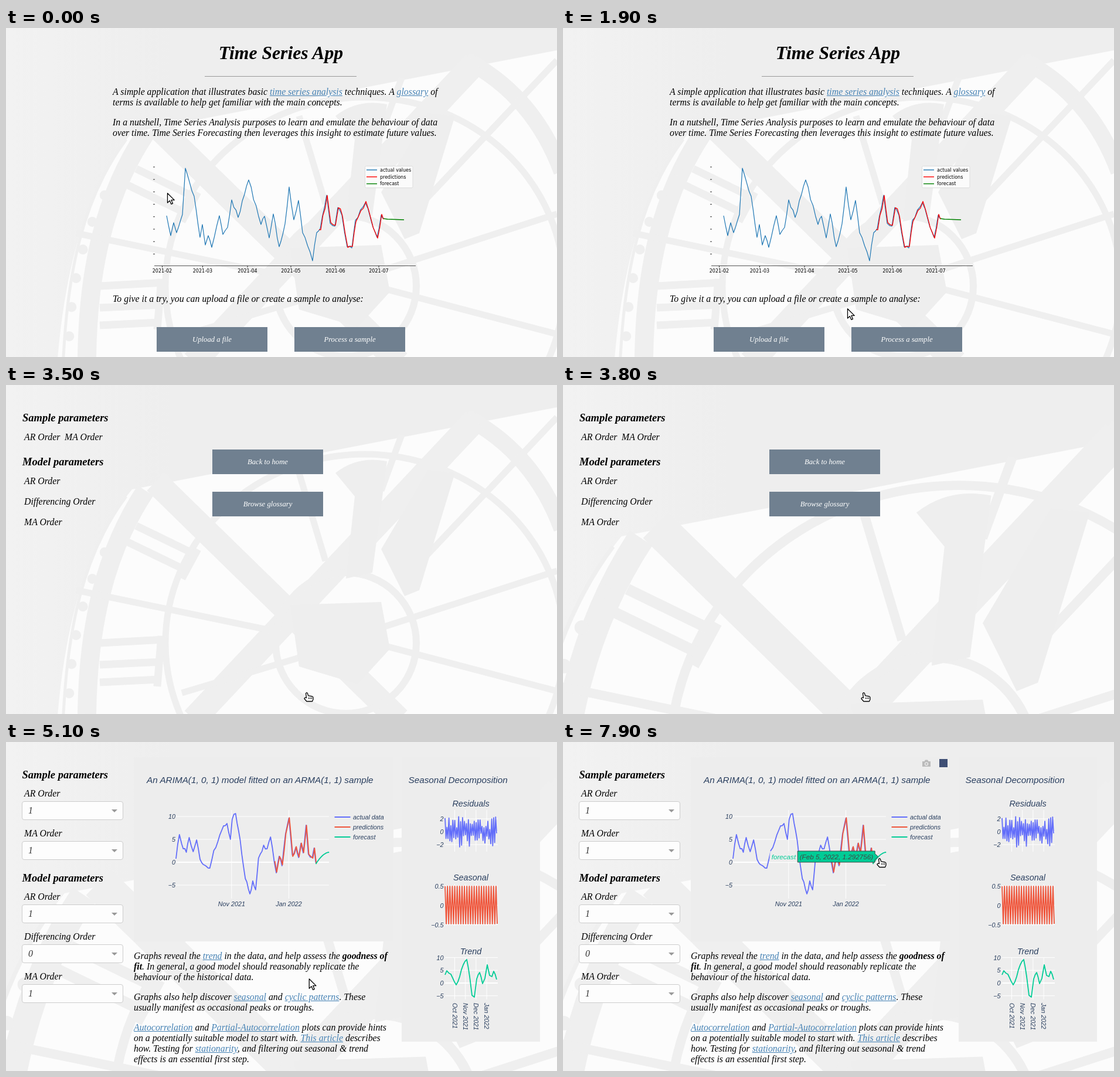
Recreate the animation shown at these times as an HTML page. Size 940x561 px, loop 8 s.

```html
<!DOCTYPE html>
<html lang="en">
<head>
<meta charset="utf-8">
<title>Time Series App</title>
<style>
html, body { margin: 0; width: 100%; height: 100%; overflow: hidden; background: #eee; }
#stage { position: relative; width: 940px; height: 561px; overflow: hidden;
  font: italic 15.84px/18px 'Liberation Serif', serif; color: #000; }
section, svg { position: absolute; left: 0; top: 0; width: 940px; height: 561px; }
#stage p, h1, h3, .btn, .select, hr { position: absolute; margin: 0; white-space: pre; }
h1 { left: 0; top: 24px; width: 938px; text-align: center; font-size: 2em; line-height: 37px; }
h3 { left: 28px; font-size: 1.17em; line-height: 21px; }
hr { left: 339px; top: 82px; width: 259px; height: 1px; border: 0; background: #999; }
u { color: #4682b4; }
.btn { width: 189px; height: 42px; background: #708090; color: #fff; font-size: .8em; line-height: 42px; text-align: center; }
.select { left: 27px; width: 161px; height: 30px; padding-left: 10px; border: 1px solid #ccc; border-radius: 4px;
  background: #fdfdfd; color: #333; line-height: 30px; }
.select::after { content: ''; position: absolute; right: 9px; top: 13px; border: 5px solid transparent; border-top-color: #999; border-bottom: 0; }
.axis { font: 8px 'DejaVu Sans', sans-serif; }
.plot { font: italic 10.8px 'Liberation Sans', sans-serif; fill: #2a3f5f; }
.title { font-size: 15.3px; }
.subtitle { font-size: 14.4px; text-anchor: middle; }
.hover { font-size: 11.7px; text-anchor: end; }
polyline { fill: none; stroke-linejoin: round; }
</style>
</head>
<body>
<div id="stage">
  <svg>
    <defs>
      <linearGradient id="wall"><stop stop-color="#f2f2f2"/><stop offset=".3" stop-color="#eee"/></linearGradient>
    </defs>
    <rect width="940" height="561" fill="url(#wall)"/>
    <g id="clock" fill="none" stroke="#efefef">
      <path fill="#fcfcfc" stroke="none" d="M215 178L940 38V720H82C82 420 140 270 215 178Z"/>
      <path stroke-width="32" d="M238 180C165 290 140 420 138 561"/>
      <path stroke-width="5" d="M205 190C130 290 105 420 98 561"/>
      <path stroke-width="17" stroke-linecap="round" stroke-dasharray="0 50" d="M195 243C145 310 107 420 107 561"/>
      <ellipse cx="612" cy="440" rx="340" ry="322" stroke-width="11"/>
      <path stroke-width="28" d="M785 55Q900 115 948 245"/>
      <path stroke-width="42" d="M255 165L670 570M800 60L320 570"/>
      <path stroke-width="11" d="M940 317L590 430 940 522M500 150L545 300M675 85L640 180M940 55L690 320M120 350L450 418M300 525L500 465"/>
      <path stroke-width="13" d="M160 440L268 434M160 477L265 472M160 507L262 502M265 428L258 514M222 240L325 290M208 268L305 315M327 280L300 330"/>
      <circle cx="580" cy="440" r="120" stroke-width="12"/>
      <path fill="#eee" stroke="none" d="M562 150Q600 120 650 130L625 320 580 330 595 190ZM720 145L766 150 705 350 680 360 640 280ZM485 375L640 370 655 450 600 510 500 480Z"/>
    </g>
  </svg>

  <section id="home">
    <h1>Time Series App</h1><hr>
    <p style="left:182px;top:100px">A simple application that illustrates basic <u>time series analysis</u> techniques. A <u>glossary</u> of
terms is available to help get familiar with the main concepts.</p>
    <p style="left:182px;top:152px">In a nutshell, Time Series Analysis purposes to learn and emulate the behaviour of data
over time. Time Series Forecasting then leverages this insight to estimate future values.</p>
    <p style="left:182px;top:453px">To give it a try, you can upload a file or create a sample to analyse:</p>
    <svg id="homeChart" class="axis"></svg>
    <div class="btn" style="left:257px;top:510px">Upload a file</div>
    <div class="btn" id="process" style="left:492px;top:510px">Process a sample</div>
  </section>

  <section id="loading">
    <h3 style="top:45px">Sample parameters</h3>
    <p style="left:31px;top:80px">AR Order</p><p style="left:100px;top:80px">MA Order</p>
    <h3 style="top:120px">Model parameters</h3>
    <p style="left:31px;top:155px">AR Order</p>
    <p style="left:31px;top:190px">Differencing Order</p>
    <p style="left:31px;top:225px">MA Order</p>
    <div class="btn" style="left:352px;top:110px">Back to home</div>
    <div class="btn" style="left:352px;top:182px">Browse glossary</div>
  </section>

  <section id="analysis">
    <svg id="charts" class="plot"></svg>
    <div id="form"></div>
    <p style="left:218px;top:356px">Graphs reveal the <u>trend</u> in the data, and help assess the <b>goodness of
fit</b>. In general, a good model should reasonably replicate the
behaviour of the historical data.</p>
    <p style="left:218px;top:426px">Graphs also help discover <u>seasonal</u> and <u>cyclic patterns</u>. These
usually manifest as occasional peaks or troughs.</p>
    <p style="left:218px;top:478px"><u>Autocorrelation</u> and <u>Partial-Autocorrelation</u> plots can provide hints
on a potentially suitable model to start with. <u>This article</u> describes
how. Testing for <u>stationarity</u>, and filtering out seasonal &amp; trend
effects is an essential first step.</p>
  </section>

  <svg>
    <g id="tip" class="plot hover">
      <rect id="tipNameBack" height="19" fill="#eee" opacity=".85"/><text id="tipName"/>
      <path id="tipBox" stroke="#444"/><text id="tipText" fill="#444"/>
    </g>
    <g id="cursor" fill="#fff" stroke="#000" stroke-width="1.3" stroke-linejoin="round">
      <path id="arrow" d="M.5 .8V17L4.3 13.4 6.9 19.3 9.5 18.2 7 12.4H12.2Z"/>
      <path id="hand" d="M-1.500 1.800Q0 -.500 1.300 1.500L2.700 5.800 9.500 7Q11 7.500 11 9V12L9.500 15.500H0L-4 11Q-4 8.500 -.500 9.500ZM3.500 9V11M6 9V11M8.500 9V11"/>
    </g>
  </svg>
</div>

<script>
const $ = id => document.getElementById(id);
const show = (id, on) => $(id).style.display = on ? '' : 'none';
const line = (points, color, width = 1.8) => `<polyline points="${points}" stroke="${color}" stroke-width="${width}"/>`;
const text = (x, y, label, attrs = '') => `<text x="${x}" y="${y}" ${attrs}>${label}</text>`;
const segment = (x1, y1, x2, y2, color = '#fff', width = 1) => line(`${x1},${y1} ${x2},${y2}`, color, width);
const range = (count, make) => Array.from({length: count}, (_, i) => make(i));
const MIDDLE = 'text-anchor="middle"', END = 'text-anchor="end"';
const BLUE = '#636efa', RED = '#ef553b', GREEN = '#00cc96';

let seed = 7;
const random = () => (seed = seed * 16807 % 2147483647) / 2147483647;

// Joins turning points with noisy steps in between
function series(turns, step, noise) {
  const points = turns.split(' ').map(pair => pair.split(',').map(Number));
  return points.flatMap(([x, y], i) => {
    if (!i) return [[x, y]];
    const [x0, y0] = points[i - 1];
    const count = Math.max(1, Math.round((x - x0) / step));
    return range(count, k => {
      const p = (k + 1) / count;
      return [x0 + (x - x0) * p, y0 + (y - y0) * p + (p < 1 ? (random() - 0.5) * noise : 0)];
    });
  });
}

// One-step-ahead predictions trail the data slightly
const predict = (points, from, lag) => points.filter(([x]) => x >= from).map(([x, y]) => [x + lag, y + (random() - 0.5) * 5]);

function homeChart() {
  const actual = series('274,320 281,354 286,332 291,349 301,318 306,239 321,287 331,357 335,335 340,370 345,354 351,374 364,320 370,352 378,340 385,293 396,323 414,259 435,335 441,321 449,358 456,317 466,373 476,334 483,271 491,327 499,294 506,349 523,397 530,349 536,342 547,285 553,333 561,338 566,306 573,319 582,373 590,375 596,328 613,298 622,325 633,357 640,319 643,325', 4, 7);
  const legend = [['actual values', '#1f77b4'], ['predictions', 'red'], ['forecast', 'green']];
  const months = [266.5, 335.5, 412, 486, 562, 636];
  return segment(253, 405.5, 699, 405.5, '#555')
    + months.map((x, i) => segment(x, 405, x, 408.5, '#333') + text(x, 416.5, `2021-0${i + 2}`, MIDDLE)).join('')
    + range(8, i => segment(251, 237 + i * 21.2, 254, 237 + i * 21.2, '#333')).join('')
    + line(actual.join(' '), '#1f77b4', 1.2) + line(predict(actual, 531, 1).join(' '), 'red', 1.3)
    + line('644,325 651,326 679,327', 'green', 1.5)
    + '<rect x="612.5" y="235.5" width="81.5" height="37" rx="2" fill="#fff" fill-opacity=".8" stroke="#ddd"/>'
    + legend.map(([name, color], i) => segment(615, 242 + i * 11.8, 633, 242 + i * 11.8, color, 1.4) + text(638, 244.7 + i * 11.8, name)).join('');
}

const sample = series('290,199 296,158 300,174 308,188 313,163 320,187 326,167 332,200 340,210 349,215 356,185 363,170 373,143 379,139 385,166 388,132 394,122 402,167 411,233 419,259 424,237 429,252 434,198 443,176 449,182 455,162 465,223 470,195 475,211 481,158 487,130 493,193 499,180 504,197 508,173 512,189 517,142 521,191 528,196 531,181 534,206', 3, 8);
const fitted = predict(sample, 459, 0.8);

function fitChart(id, scale, legendX, right) {
  const at = x => 290 + (x - 290) * scale;
  const squeeze = points => points.map(([x, y]) => [at(x), y]).join(' ');
  const level = v => 205 - v * 7.8;
  const forecast = range(9, i => [534 + i * 2.9, 188 + 20 * (1 - i / 8) ** 1.8]);
  const legend = [['actual data', BLUE], ['predictions', RED], ['forecast', GREEN]];
  return `<g id="${id}"><rect x="218" y="26" width="${right - 218}" height="314" fill="#ededed"/>`
    + text(240, 70, 'An ARIMA(1, 0, 1) model fitted on an ARMA(1, 1) sample', 'class="title"')
    + [10, 5, 0, -5].map(v => segment(290, level(v), at(557), level(v), '#fff', v ? 1 : 2)
        + text(289, level(v) + 4, String(v).replace('-', '−'), END)).join('')
    + [[387, 'Nov 2021'], [487, 'Jan 2022']].map(([x, name]) => segment(at(x), 116, at(x), 267) + text(at(x), 280, name, MIDDLE)).join('')
    + line(squeeze(sample), BLUE) + line(squeeze(fitted), RED) + line(squeeze(forecast), GREEN)
    + legend.map(([name, color], i) => segment(legendX, 128 + i * 17, legendX + 27, 128 + i * 17, color, 2)
        + text(legendX + 31.5, 131.7 + i * 17, name)).join('') + '</g>';
}

function decomposition() {
  const months = ['Oct 2021', 'Nov 2021', 'Dec 2021', 'Jan 2022'].map((name, i) => [765.5 + i * 18.2, name]);
  const panel = (name, top, zero, gap, ticks) => text(793, top - 6, name, 'class="subtitle"')
    + months.map(([x]) => segment(x, top, x, top + 71)).join('')
    + ticks.map((v, i) => {
      const y = zero + (i - ticks.indexOf(0)) * gap;
      return segment(749, y, 839, y, '#fff', v ? 1 : 2) + text(746.5, y + 4, String(v).replace('-', '−'), END);
    }).join('');
  const side = i => i % 2 ? 1 : -1;
  const residuals = range(54, i => [749 + i * 1.66, 153 + side(i) * (2 + 24 * random())]);
  const wave = range(44, i => [749 + i * 2.07, 278 + side(i) * 32]);
  const trend = series('749,397 752,390 759,396 768,414 774,400 780,380 786,371 791,400 795,432 799,435 803,404 808,393 813,412 817,403 821,380 825,398 829,400 832,391 837,405', 3, 4);
  return '<rect x="675" y="26" width="236" height="485" fill="#ededed"/>'
    + text(686.5, 70, 'Seasonal Decomposition', 'class="title"')
    + panel('Residuals', 116, 153, 22, [2, 0, -2]) + line(residuals.join(' '), BLUE)
    + panel('Seasonal', 242, 278.5, 33, [0.5, 0, -0.5]) + line(wave.join(' '), RED)
    + panel('Trend', 368, 411, 21.7, [10, 5, 0, -5]) + line(trend.join(' '), GREEN)
    + months.map(([x, name]) => `<text transform="translate(${x - 4} 445) rotate(90)">${name}</text>`).join('');
}

const modebar = `<g id="modebar"><path fill="#bbb" fill-rule="evenodd" d="M613 33h3.5l1.5-2.5h4l1.5 2.5h3.5v9h-14ZM620 34.2a3.2 3.2 0 1 0 .01 0Z"/>
  <circle cx="620" cy="37.4" r="1.8" fill="#bbb"/><rect x="642" y="29" width="14" height="14" fill="#3f4f75"/></g>`;

const fieldset = (name, top, fields) => `<h3 style="left:27.5px;top:${top}px">${name} parameters</h3>`
  + fields.map(([label, value], i) => `<p style="left:31px;top:${top + 34 + i * 68}px">${label} Order</p>
    <div class="select" style="top:${top + 56 + i * 68}px">${value}</div>`).join('');

$('homeChart').innerHTML = homeChart();
$('charts').innerHTML = fitChart('wide', 1, 567, 668) + fitChart('narrow', 0.9775, 560.5, 661) + decomposition() + modebar;
$('form').innerHTML = fieldset('Sample', 45, [['AR', 1], ['MA', 1]])
  + fieldset('Model', 221, [['AR', 1], ['Differencing', 0], ['MA', 1]]);

// Time, x and y of the pointer's hot spot
const pointerPath = [[700, 275, 281], [1600, 434, 417], [1900, 485, 478], [2400, 513, 524], [4800, 513, 524],
  [5600, 523, 202], [6300, 523, 202], [6700, 538, 198], [7800, 538, 198], [7900, 540, 198]];

function pointerAt(t) {
  const i = pointerPath.findIndex(([time]) => time >= t);
  if (i < 1) return pointerPath.at(i).slice(1);
  const [t0, x0, y0] = pointerPath[i - 1], [t1, x1, y1] = pointerPath[i];
  const p = (t - t0) / (t1 - t0);
  return [x0 + (x1 - x0) * p, y0 + (y1 - y0) * p];
}

// Labels the data point nearest to the pointer
function drawTip(pointerX) {
  const day = 25 + Math.round((pointerX - 523) * 10 / 17);
  const isForecast = day > 29;
  const value = isForecast ? 1.292756 * Math.sqrt((day - 28) / 7) : 0.8197502 - (day - 25) * 0.0718436;
  const date = day < 31 ? `Jan ${day + 1}` : `Feb ${day - 30}`;
  const x = 482 + day * 1.59, y = Math.round(205.5 - value * 7.8) + 0.5, right = x - 5.5;
  const color = isForecast ? GREEN : RED;
  const put = (id, label, end) => {
    const node = $(id);
    node.textContent = label;
    node.setAttribute('x', end);
    node.setAttribute('y', y + 4);
    return end - node.getComputedTextLength();
  };
  const left = put('tipText', `(${date}, 2022, ${value.toFixed(isForecast ? 6 : 7)})`, right - 3) - 3.5;
  const nameLeft = put('tipName', isForecast ? 'forecast' : 'predictions', left - 3);
  $('tipName').setAttribute('fill', color);
  $('tipBox').setAttribute('fill', color);
  $('tipBox').setAttribute('d', `M${x} ${y}L${right} ${y - 5}V${y - 9.5}H${left}V${y + 9.5}H${right}V${y + 5}Z`);
  const back = $('tipNameBack');
  back.setAttribute('x', nameLeft - 3);
  back.setAttribute('y', y - 9.5);
  back.setAttribute('width', left - nameLeft + 3);
}

function drawButton(t) {
  const p = Math.max(0, Math.min(1, (t - 2100) / 300));
  const lift = t >= 3200 ? 3 : 7 * p;
  const mix = (from, to) => Math.round(from + (to - from) * p);
  const style = $('process').style;
  style.transform = `translateY(${-lift}px)`;
  style.background = `rgb(${mix(112, 64)},${mix(128, 64)},${mix(144, 64)})`;
  style.color = `rgb(255,${mix(255, 248)},${mix(255, 220)})`;
  style.boxShadow = p ? `${5 * p}px ${lift * 0.85}px ${8 * p}px #333` : 'none';
}

function frame() {
  const t = Math.floor(performance.now() % 8000 / 100) * 100;
  const [x, y] = pointerAt(t);
  const isHand = t >= 2200 && (t <= 4800 || y < 270);
  const hasTip = t >= 5500;
  show('home', t < 3500);
  show('loading', t >= 3500 && t < 4100);
  show('analysis', t >= 4100);
  show('wide', t < 4300);
  show('narrow', t >= 4300);
  show('modebar', t > 4800 && y < 340);
  show('arrow', !isHand);
  show('hand', isHand);
  show('tip', hasTip);
  $('clock').setAttribute('transform', t < 3800 ? '' : 'translate(-212) scale(1.45)');
  $('cursor').setAttribute('transform', `translate(${x} ${y})`);
  drawButton(t);
  if (hasTip) drawTip(x);
  requestAnimationFrame(frame);
}
frame();
</script>
</body>
</html>
```
